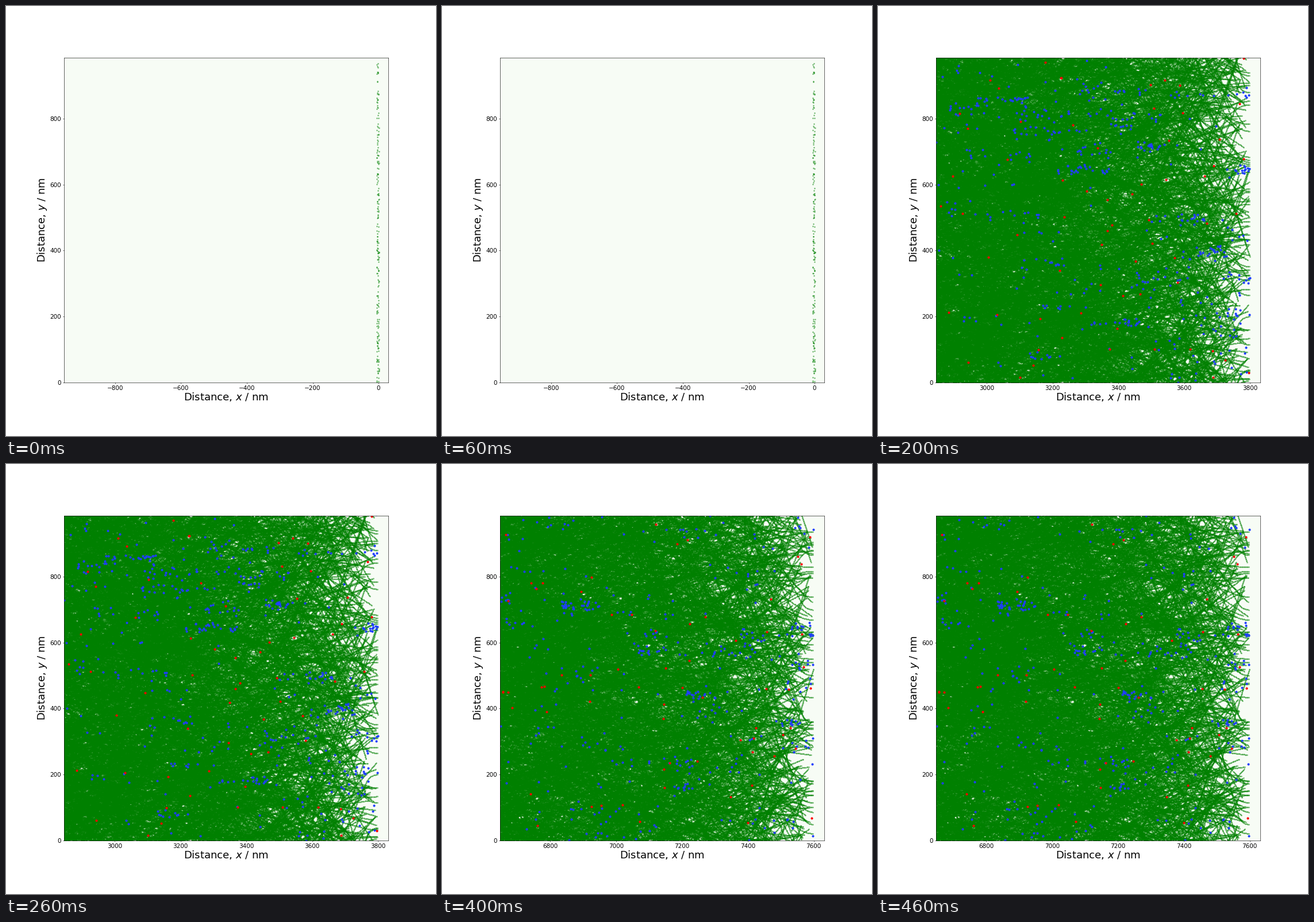
A matplotlib script for the animation above (500 ms loop, 748 by 748 pixels).

```python
import numpy as np
import matplotlib.pyplot as plt
from matplotlib.animation import FuncAnimation
from matplotlib.ticker import MultipleLocator

SIZE, DPI = 748, 68
PT = 72 / DPI                # points per pixel
SPAN = 985                   # visible width and height in nm
LEFT, RIGHT, BASE, TOP = 101.1, 665.3, 654.8, 89.8
SPACING = 2.7                # nm between subunits along a filament
MAX_LEN = 560                # subunits in the longest filament

plt.rcParams["font.family"] = "DejaVu Sans"
fig = plt.figure(figsize=(SIZE / DPI, SIZE / DPI), dpi=DPI, facecolor="white")
ax = fig.add_axes([LEFT / SIZE, 1 - BASE / SIZE,
                   (RIGHT - LEFT) / SIZE, (BASE - TOP) / SIZE])
ax.set_facecolor("#f7fcf5")
ax.set_ylim(0, SPAN)
for axis in (ax.xaxis, ax.yaxis):
    axis.set_major_locator(MultipleLocator(200))
ax.tick_params(length=2.42 * PT, pad=2.42 * PT, width=0.6 * PT,
               labelsize=10.39 * PT)
for spine in ax.spines.values():
    spine.set_linewidth(0.6 * PT)

label = dict(fontsize=18 * PT, ha="center", va="baseline")
fig.text(383 / SIZE, 1 - 686.4 / SIZE, "Distance, $x$ / nm", **label)
fig.text(68.4 / SIZE, 1 - 371.7 / SIZE, "Distance, $y$ / nm",
         rotation=90, rotation_mode="anchor", **label)


def dots(color, size, alpha=1):
    return ax.plot([], [], "o", color=color, ms=size * PT, mew=0,
                   alpha=alpha)[0]


subunits = dots("green", 2.4, 0.6)
branches = dots("#1f3fff", 4.1)
caps = dots("red", 4.1)


def filaments(rng, count, held=45):
    """Points of gently bent filaments; the held ones touch the front at x = 0."""
    total = count + held
    tip = rng.uniform(0, SPAN, total)
    tip[:held] = 0
    y0 = rng.uniform(0, SPAN, total)
    angle = np.clip(rng.normal(0, 38, total), -72, 72)
    bend = rng.normal(0, 0.035, total)
    length = np.minimum(rng.exponential(220, total) + 12, MAX_LEN)

    k = np.arange(MAX_LEN)
    theta = np.radians(angle[:, None] + bend[:, None] * k)
    theta[:held] *= np.minimum(k / 16, 1)    # flattened against the front
    x = -tip[:, None] - SPACING * np.cumsum(np.cos(theta), axis=1)
    y = y0[:, None] + SPACING * np.cumsum(np.sin(theta), axis=1)
    keep = (k < length[:, None]) & (x > -SPAN)
    return x[keep], y[keep] % SPAN


def branch_points(rng, streaks=60, loose=130):
    """Horizontal streaks of points plus an even scatter."""
    n = rng.geometric(1 / 6, streaks)
    start = rng.uniform(-SPAN, -40, streaks)
    reach = rng.uniform(40, 260, streaks)
    y0 = rng.uniform(0, SPAN, streaks)
    x = np.repeat(start, n) + np.repeat(reach, n) * rng.random(n.sum())
    y = np.repeat(y0, n) + rng.normal(0, 9, n.sum())
    x = np.r_[np.where(x > 0, -x, x), rng.uniform(-SPAN, 0, loose)]
    return x, np.r_[y, rng.uniform(0, SPAN, loose)]


def update(stage):
    rng = np.random.default_rng(40 + stage)
    front = 1900 * stage
    right = 30 + 1900.7 * stage
    ax.set_xlim(right - SPAN, right)
    if stage == 0:
        subunits.set_data(rng.uniform(-6, 1, 215), rng.uniform(0, SPAN, 215))
        branches.set_data([], [])
        caps.set_data([], [])
    else:
        # the network is denser once it has grown past the first window
        x, y = filaments(rng, 2200 if stage == 1 else 3300)
        subunits.set_data(front + x, y)
        x, y = branch_points(rng)
        branches.set_data(front + x, y)
        caps.set_data(front - rng.uniform(0, 950, 66),
                      rng.uniform(0, SPAN, 66))
    return subunits, branches, caps


anim = FuncAnimation(fig, update, frames=5, interval=100,
                     init_func=lambda: update(0), repeat=True, repeat_delay=0)
plt.show()
```
